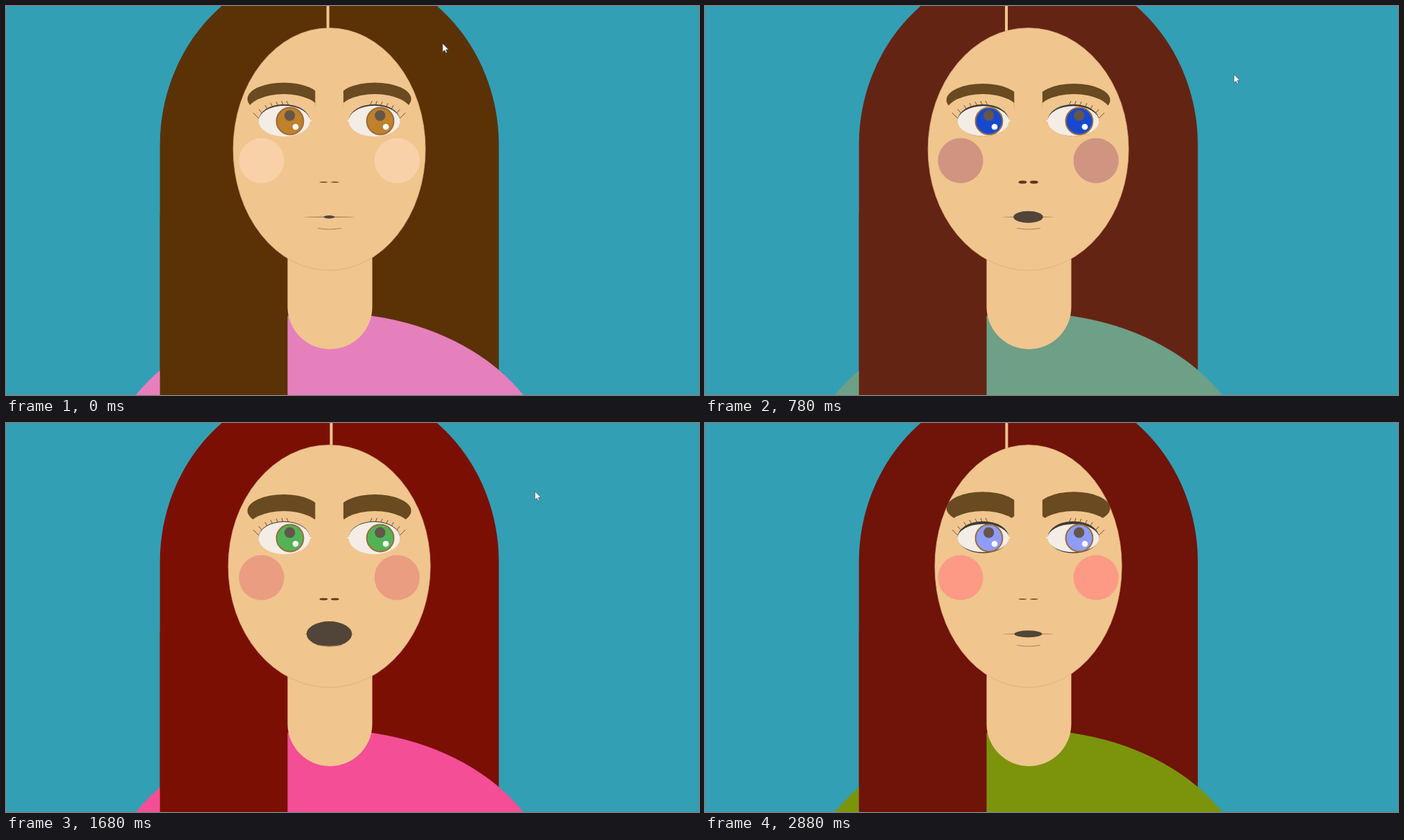
Animation, 998 px wide and 561 px high, one loop 3.16 s. Source, as an HTML page:

```html
<!DOCTYPE html>
<html lang="en">
<head>
<meta charset="utf-8">
<title>Portrait</title>
<style>
  html, body { margin: 0; width: 100%; height: 100%; overflow: hidden; background: #329fb4; }
  svg { display: block; width: 998px; height: 561px; }
  .skin { fill: #f1c58e; }
  .lash { fill: none; stroke: #6d5032; stroke-width: 1; }
  .dark { fill: #3d3a34; }
  .white { fill: #f4ede6; }
</style>
</head>
<body>
<svg viewBox="0 0 998 561">
  <defs>
    <clipPath id="browCut"><rect x="340" y="90" width="105.3" height="70"/></clipPath>
    <g id="eye">
      <circle class="iris" cx="409" cy="166" r="19.4" stroke="#9b6c38" stroke-width="2"/>
      <circle cx="408.7" cy="158" r="7.7" fill="#64564a"/>
      <circle cx="417" cy="174.2" r="4.3" fill="#fff"/>
    </g>
  </defs>

  <path class="hair" d="M221.7 561V200A244 259 0 0 1 709.7 200V561Z"/>
  <ellipse id="shirt" cx="466" cy="686" rx="325" ry="243.5"/>
  <rect class="hair" x="221.7" y="300" width="183.8" height="261"/>
  <rect id="part" class="skin" y="0" width="4" height="60"/>
  <path class="skin" d="M405.5 330H527.5V434A61 61 0 0 1 405.5 434Z"/>
  <ellipse id="face" class="skin" cx="465.6" cy="206.5" ry="174.8" stroke="#d9ae7a" stroke-width=".8"/>

  <g id="side">
    <g clip-path="url(#browCut)">
      <ellipse id="brow" cx="400" rx="52.3" ry="23.5" fill="#694a21"/>
      <ellipse class="skin" cx="400" cy="153" rx="52.6" ry="26"/>
    </g>
    <path class="lash" d="M356 154l8 8M364 149l5 6M373 143l4 7M381 140l3 6M389 138l3 6M397 137l2 6M404 137l3 6"/>
    <ellipse class="dark" cx="400.6" cy="164.7" rx="36.8" ry="23"/>
    <ellipse id="white" class="white" cx="400.7" cy="166" rx="37"/>
    <path class="white" d="M434 162L440.5 165.5L434 169Z"/>
    <circle id="blush" cx="368" cy="223" r="32.6"/>
    <ellipse id="nostril" cx="457.4" cy="254" rx="6" fill="#623817"/>
  </g>
  <use href="#side" transform="translate(931.2) scale(-1 1)"/>
  <use href="#eye"/>
  <use href="#eye" x="130"/>

  <ellipse cx="465.5" cy="304.3" rx="36.5" ry=".7" fill="#a88257"/>
  <ellipse id="mouth" cx="465.5" cy="304.3" fill="#504538"/>
  <path d="M449 320.5Q466 323.5 483 320.5" fill="none" stroke="#b5895c" stroke-width="1.2"/>
  <path id="cursor" d="M0 0V12.2L2.8 9.7L4.7 13.6L6.5 12.8L4.7 9H8.6Z" fill="#fff" stroke="#3c5058" stroke-width=".7"/>
</svg>
<script>
const LOOP = 3160;

// time, hair, shirt, iris, blush, face rx, parting x, brow top, eye white ry, nostril ry, mouth rx, mouth ry
const looks = [
  [0,    '5a3205', 'e580bd', 'c0802c', 'f8d1a8', 138.4, 463.6, 110.4, 22.3, 0.7, 8, 2.2],
  [480,  '3c230f', '9fc0d8', '0a50b4', 'cf9480', 147,   424.6, 111,   22,   2.2, 24, 7.4],
  [1180, '992618', '2d721c', '2540f5', 'd09682', 141,   446.6, 113.4, 21.4, 2.5, 17.6, 9.8],
  [1680, '7c0f04', 'f44e96', '52b356', 'ea9d80', 145.5, 468.4, 103,   23.3, 1.6, 32.7, 18.2],
  [1980, '8d2c16', 'dd930a', '7ba04f', 'f59e85', 133.7, 432.8, 114,   20.2, 1.6, 12.8, 10.8],
  [2380, '052c03', '0a76cc', 'acea52', 'f99f80', 154.5, 427,   107,   20.2, 1,   31, 4],
  [2880, '701309', '7b940c', '8f9cff', 'fd9a86', 134.6, 434.4, 99.3,  20.2, 0.8, 19.8, 5]
];

const $ = id => document.getElementById(id);
const mix = (a, b, p) => a + (b - a) * p;
const clamp = x => Math.min(1, Math.max(0, x));
const set = (id, attrs) => {
  for (const k in attrs) $(id).setAttribute(k, attrs[k]);
};
const paint = (list, color) => list.forEach(el => el.setAttribute('fill', color));
const hairs = document.querySelectorAll('.hair');
const irises = document.querySelectorAll('.iris');

function mixColor(a, b, p) {
  const rgb = [0, 2, 4].map(i =>
    Math.round(mix(parseInt(a.substr(i, 2), 16), parseInt(b.substr(i, 2), 16), p)));
  return `rgb(${rgb})`;
}

// The picture holds between ticks: short ones early, then every 100 ms.
function tick(t) {
  if (t < 100) return 0;
  if (t < 480) return 100 + Math.floor((t - 100) / 54.3) * 54.3;
  return Math.min(2880, 80 + Math.floor((t - 80) / 100) * 100);
}

function lookAt(t) {
  let i = 0;
  while (i < looks.length - 2 && t >= looks[i + 1][0]) i++;
  const a = looks[i], b = looks[i + 1];
  const p = clamp((t - a[0]) / (b[0] - a[0]));
  return a.map((v, k) => (typeof v === 'string' ? mixColor : mix)(v, b[k], p));
}

function draw(time) {
  const t = tick(time % LOOP);
  const [, hair, shirt, iris, blush, face, part, brow, white, nostril, mouthX, mouthY] = lookAt(t);
  paint(hairs, hair);
  paint(irises, iris);
  set('shirt', { fill: shirt });
  set('blush', { fill: blush });
  set('face', { rx: face });
  set('part', { x: part - 2 });
  set('brow', { cy: brow + 23.5 });
  set('white', { ry: white });
  set('nostril', { ry: nostril });
  set('mouth', { rx: mouthX, ry: mouthY });

  const arrive = clamp(t / 480), leave = clamp((t - 2580) / 200);
  const x = mix(628.8, 761.8, arrive) + 216 * leave;
  const y = mix(54, 98.6, arrive) + 20 * leave;
  set('cursor', {
    transform: `translate(${x} ${y})`,
    visibility: t < 2880 ? 'visible' : 'hidden'
  });
}

const start = performance.now();
function frame() {
  draw(performance.now() - start);
  requestAnimationFrame(frame);
}
frame();
</script>
</body>
</html>
```
